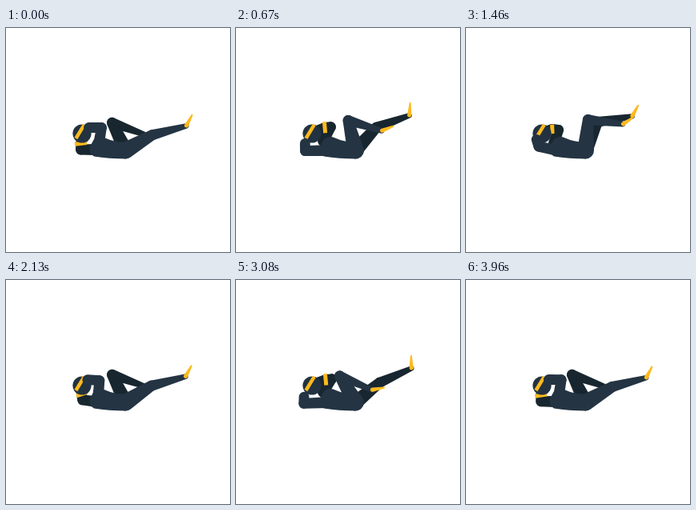
Recreate the animation shown at these times as an HTML page with a canvas. Size 280 by 280 pixels, loop 4000 ms.

```html
<!DOCTYPE html>
<html lang="en">
<head>
<meta charset="utf-8">
<title>Bicycle crunch</title>
<style>
  html, body { margin: 0; width: 100%; height: 100%; overflow: hidden; background: #fff; }
  canvas { display: block; width: 280px; height: 280px; }
</style>
</head>
<body>
<canvas id="stage"></canvas>
<script>
const NEAR = '#243443', FAR = '#18262f', HEAD = '#223240', GOLD = '#fdb91e';
const SIZE = 280, REP = 2000, FPS = 24;
const HIP = [149.5, 153], SHOULDER = [114.5, 153], NAPE = [100, 129];

// Progress of the four key poses: near leg straight -> far leg straight.
const KNOTS = [0, 0.56, 0.75, 1];
const POSE = {
  nearThigh: [30, 85, 104, 122],
  nearShank: [15, -7, -17, -23],
  nearFoot: [62, 34, 22, 10],
  farThigh: [116, 68, 48, 40],
  farShank: [-20, 9, 20, 24],
  farFoot: [15, 60, 86, 90],
  nearElbowX: [119.5, 91, 86.5, 84.8],
  nearElbowY: [124.5, 148, 153.7, 154],
  nearHandX: [103.5, 88.2, 86.3, 85],
  nearHandY: [124.5, 139.2, 144.5, 146],
  farElbowX: [93.5, 115.5, 118.5, 119.5],
  farElbowY: [152, 127.5, 123.7, 124],
  farShoulderX: [112, 110, 109, 109],
  farShoulderY: [152, 144, 141, 140],
  cuffX: [93.5, 107.7, 111, 112],
  cuffY: [144.4, 126.5, 124.3, 124.5],
  cuffTurn: [7, 92, 95, 96],
  cuffSize: [15, 11.5, 14, 14]
};

const canvas = document.getElementById('stage');
const ctx = canvas.getContext('2d');
const ratio = window.devicePixelRatio || 1;
canvas.width = canvas.height = SIZE * ratio;
ctx.scale(ratio, ratio);

// Smooth curve through the key poses.
function blend(values, p) {
  return values.reduce((sum, v, i) => sum + KNOTS.reduce(
    (w, k, j) => j === i ? w : w * (p - k) / (KNOTS[i] - k), v), 0);
}

function reach([x, y], angle, length) {
  const a = angle * Math.PI / 180;
  return [x + Math.cos(a) * length, y - Math.sin(a) * length];
}

// Tapered capsule between two round joints.
function limb(a, ra, b, rb, color) {
  const dx = b[0] - a[0], dy = b[1] - a[1];
  const turn = Math.atan2(dy, dx);
  const open = Math.acos(Math.max(-1, Math.min(1, (ra - rb) / Math.hypot(dx, dy))));
  ctx.fillStyle = color;
  ctx.beginPath();
  ctx.arc(a[0], a[1], ra, turn + open, turn - open + 2 * Math.PI);
  ctx.arc(b[0], b[1], rb, turn - open, turn + open);
  ctx.fill();
}

function band(a, b, width) {
  ctx.strokeStyle = GOLD;
  ctx.lineWidth = width;
  ctx.beginPath();
  ctx.moveTo(...a);
  ctx.lineTo(...b);
  ctx.stroke();
}

function leg(thigh, shank, foot, hipR, color) {
  const knee = reach(HIP, thigh, 38.5);
  const ankle = reach(knee, shank, 44);
  limb(HIP, hipR, knee, 6.6, color);
  limb(knee, 6.6, ankle, 3.2, color);
  limb(reach(ankle, foot, 0.5), 2.6, reach(ankle, foot, 15.3), 1, GOLD);
}

function arm(shoulder, elbow, hand, color) {
  limb(shoulder, 7, elbow, 6.4, color);
  limb(elbow, 6.4, hand, 6.4, color);
}

function head() {
  ctx.fillStyle = HEAD;
  ctx.beginPath();
  ctx.arc(95, 132, 11.6, 0, 2 * Math.PI);
  ctx.fill();
  band([87.4, 138], [97.8, 120.8], 4.4);
}

function torso() {
  ctx.fillStyle = NEAR;
  ctx.beginPath();
  ctx.moveTo(110, 139);
  ctx.quadraticCurveTo(116, 134, 124, 137.5);
  ctx.quadraticCurveTo(136, 143, 150, 142.5);
  ctx.lineTo(158, 152);
  ctx.lineTo(150, 163.5);
  ctx.quadraticCurveTo(128, 163.5, 110, 160.5);
  ctx.quadraticCurveTo(103, 157, 105, 148);
  ctx.fill();
}

function draw(time) {
  const frame = Math.floor((time + 4) * FPS / 1000);
  const p = (1 - Math.cos(2 * Math.PI * frame * 1000 / FPS / REP)) / 2;
  const s = {};
  for (const key in POSE) s[key] = blend(POSE[key], p);

  ctx.fillStyle = '#fff';
  ctx.fillRect(0, 0, SIZE, SIZE);

  leg(s.farThigh, s.farShank, s.farFoot, 9, FAR);
  const cuff = [s.cuffX, s.cuffY];
  arm([s.farShoulderX, s.farShoulderY], [s.farElbowX, s.farElbowY], cuff, FAR);
  limb(cuff, 6.4, NAPE, 6.4, FAR);
  const half = s.cuffSize / 2;
  band(reach(cuff, s.cuffTurn, -half), reach(cuff, s.cuffTurn, half), 5);
  head();
  torso();
  leg(s.nearThigh, s.nearShank, s.nearFoot, 10.5, NEAR);
  arm(SHOULDER, [s.nearElbowX, s.nearElbowY], [s.nearHandX, s.nearHandY], NEAR);
}

const start = performance.now();
function tick() {
  draw((performance.now() - start) % (2 * REP));
  requestAnimationFrame(tick);
}
tick();
</script>
</body>
</html>
```
